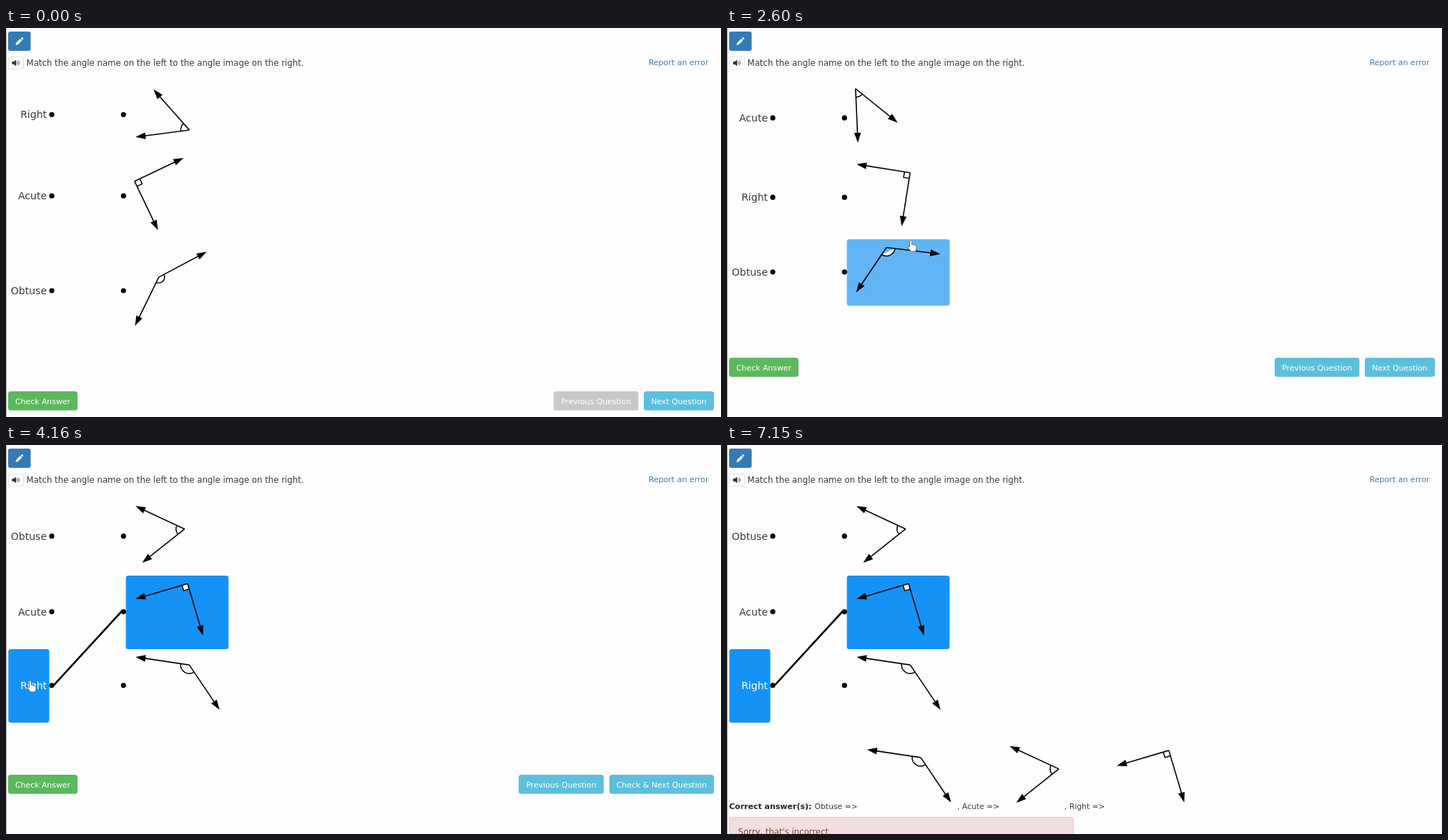
These frames come from a looping animation (1000x545 px, 8.06 s). An HTML page:

```html
<!DOCTYPE html>
<html lang="en">
<head>
<meta charset="utf-8">
<title>Match the angles</title>
<style>
html, body { margin: 0; width: 100%; height: 100%; overflow: hidden; background: #fefefe; }
svg { display: block; width: 100%; height: 100%; font-family: "DejaVu Sans", Verdana, sans-serif; }
</style>
</head>
<body>
<svg viewBox="0 0 1000 545">
  <rect width="1000" height="545" fill="#fefefe"/>
  <rect width="1" height="545" fill="#b4b4b4"/>
  <rect x="3" y="5" width="31.5" height="27" rx="3" fill="#337ab7"/>
  <path d="M13.4 24l.8-3.2 5.8-5.8 2.4 2.4-5.8 5.800zM20.700 14.300l1-1q.6-.5 1.200 0l1.200 1.200q.5.6 0 1.200l-1 1z" fill="#fff"/>
  <rect x="3.5" y="40.5" width="21" height="17" rx="2" fill="#fff" stroke="#e2e2e2"/>
  <path d="M8.500 47h2.500l3.200-2.600v9.200l-3.200-2.600h-2.500z" fill="#333"/>
  <path d="M15.600 47q1.500 2 0 4M17.300 45.600q2.600 3.400 0 6.800" fill="none" stroke="#444" stroke-width=".9"/>
  <text x="28.5" y="53" font-size="11.75" fill="#383838">Match the angle name on the left to the angle image on the right.</text>
  <text x="982.5" y="51.5" font-size="11" fill="#3a7ca8" text-anchor="end">Report an error</text>
  <g id="scene"></g>
  <g id="pointer"></g>
</svg>
<script>
const LOOP = 8060, STEP = 130;
const PICKED = 3510, MATCHED = 4160, CHECKED = 5200;
const RAY = 75.9, MARGIN = 1.4;   // ray length and free space past each tip
const BLUE = '#5bc0de', INK = '#383838';
const scene = document.getElementById('scene');
const pointer = document.getElementById('pointer');

// Angles are [direction of the first ray, opening], in degrees clockwise
const pages = [
  { from: 0, names: ['Right', 'Acute', 'Obtuse'], angles: [[172.5, 56], [-25.5, 90], [-28, 144]] },
  { from: 650, names: ['Right', 'Acute', 'Obtuse'], angles: [[-51, 53.5], [179, 155], [207, 90]] },
  { from: 2470, names: ['Acute', 'Right', 'Obtuse'], angles: [[39, 48.5], [99, 90], [7, 117]] },
  { from: 2990, names: ['Obtuse', 'Acute', 'Right'], angles: [[141.5, 63.5], [73.5, 90], [56, 132.5]] }
];

// Pointer path: time, x, y
const path = [
  [130, 830, 530], [650, 941, 522], [1170, 941, 522], [1950, 360, 364], [2080, 360, 364],
  [2340, 941, 412], [2600, 257, 297], [2860, 941, 474], [2990, 941, 474], [3120, 226, 240],
  [3380, 226, 240], [3510, 226, 300], [4160, 34, 330], [4420, 34, 330], [4810, 49, 463],
  [5200, 52, 475], [5330, 52, 475], [5980, 517, 472], [6890, 517, 472], [7150, 800, 545]
];

const box = (x, y, w, h, r, fill, line = 'none') =>
  `<rect x="${x}" y="${y}" width="${w}" height="${h}" rx="${r}" fill="${fill}" stroke="${line}"/>`;
const label = (x, y, size, fill, str, more = '') =>
  `<text x="${x}" y="${y}" font-size="${size}" fill="${fill}" ${more}>${str}</text>`;
const dot = (x, y) => `<circle cx="${x}" cy="${y}" r="3.6"/>`;
const button = (x, y, w, fill, str, ink = '#fff') =>
  box(x, y, w, 26.7, 3.5, fill) + label(x + w / 2, y + 17.5, 10.9, ink, str, 'text-anchor="middle"');

// Extent of an angle around its vertex
function extent([dir, open]) {
  const rays = [dir, dir + open].map(d => d * Math.PI / 180);
  const xs = rays.map(a => Math.cos(a) * (RAY + MARGIN)), ys = rays.map(a => Math.sin(a) * (RAY + MARGIN));
  const left = Math.min(0, ...xs), top = Math.min(0, ...ys);
  return { left, top, w: Math.max(0, ...xs) - left, h: Math.max(0, ...ys) - top };
}

// Stack the angles below each other; panels, dots and buttons follow from their sizes
for (const page of pages) {
  let y = 85;
  page.rows = page.angles.map(angle => {
    const size = extent(angle), top = y;
    y += size.h + 28.4;
    return { angle, size, top, mid: top + size.h / 2 + 2.3, panelTop: Math.round(top - 11.2), panelEnd: Math.round(y - 11.2) };
  });
  page.panelWidth = Math.max(...page.rows.map(r => r.size.w)) + 24;
  page.bar = Math.round(y + 61.8);
}

// Draw an angle with the top left corner of its extent at x, y
function drawAngle([dir, open], size, x, y) {
  const r = dir < 0 ? 8 : 12, turn = open * Math.PI / 180;
  const mark = open === 90 ? 'M8 0V8H0' : `M${r} 0A${r} ${r} 0 0 1 ${r * Math.cos(turn)} ${r * Math.sin(turn)}`;
  const ray = deg => `<g transform="rotate(${deg})"><path d="M0 0H${RAY - 8}" stroke="#000" stroke-width="1.6"/>` +
    `<path d="M${RAY} 0l-14-4.700v9.400z"/></g>`;
  return `<g transform="translate(${x - size.left} ${y - size.top}) rotate(${dir})">` +
    (open === 90 ? '<path d="M0 0H8V8H0z" fill="#fff"/>' : '') +
    `<path d="${mark}" fill="#fff" stroke="#000" stroke-width="1.5"/>${ray(0)}${ray(open)}</g>`;
}

function pointerAt(t) {
  const i = path.findIndex(k => k[0] > t);
  if (i < 1) return null;
  const [a, x1, y1] = path[i - 1], [b, x2, y2] = path[i];
  const k = (t - a) / (b - a), ease = k * k * (3 - 2 * k);
  return { x: x1 + (x2 - x1) * ease, y: y1 + (y2 - y1) * ease };
}

// What lies under the pointer: a side and row of the quiz, or a button
function hit(page, p, t) {
  if (!p || t >= CHECKED) return {};
  const row = page.rows.findIndex(r => p.y >= r.panelTop && p.y < r.panelEnd);
  if (row >= 0 && p.x > 3 && p.x < 61) return { side: 'left', row };
  if (row >= 0 && p.x > 168 && p.x < 168 + page.panelWidth) return { side: 'right', row };
  const onBar = p.y > page.bar + 1 && p.y < page.bar + 26;
  return { button: onBar && (p.x < 100 || p.x > 766) };
}

function panels(t, page, over) {
  return page.rows.map((r, i) => ['left', 'right'].map(side => {
    const picked = side === 'right' ? t >= PICKED && i === 1 : t >= MATCHED && i === 2;
    if (!picked && !(over.side === side && over.row === i)) return '';
    const [x, w] = side === 'left' ? [3.3, 57.2] : [167.6, page.panelWidth];
    return box(x, r.panelTop, w, r.panelEnd - r.panelTop, 3.5, picked ? '#1592f6' : '#62b5f4');
  }).join('')).join('');
}

function buttons(t, page) {
  const y = page.bar, check = button(3, y, 97, '#5cb85c', 'Check Answer');
  if (t >= MATCHED) {
    return check + button(717, y, 119, BLUE, 'Previous Question') +
      button(844, y, 146, BLUE, 'Check &amp; Next Question');
  }
  return check + button(766, y, 118.5, page.from ? BLUE : '#c8c8c8', 'Previous Question') +
    button(892, y, 98, BLUE, 'Next Question');
}

function feedback([acute, right, obtuse]) {
  let x = 122.5, out = label(3, 510, 11, '#222', 'Correct answer(s):', 'font-weight="bold"');
  [['Obtuse', obtuse], [', Acute', acute], [', Right', right]].forEach(([name, r]) => {
    out += label(x, 510, 10.8, INK, name + ' =&gt;') + drawAngle(r.angle, r.size, x + 72, 502 - r.size.h);
    x += r.size.w + 79.8;
  });
  return out + box(3.5, 521.5, 481, 40, 3, '#f2dede', '#ebccd1') +
    label(15.5, 545.5, 11.7, '#7d4744', "Sorry, that's incorrect.");
}

function drawScene(t, page, over) {
  let out = panels(t, page, over);
  page.rows.forEach((r, i) => {
    const ink = t >= MATCHED && i === 2 ? '#fff' : INK;
    out += label(57, r.mid + 5.2, 14, ink, page.names[i], 'text-anchor="end"') + dot(64, r.mid) + dot(164.3, r.mid) +
      drawAngle(r.angle, r.size, 179.8, r.top);
  });
  if (t >= MATCHED) out += `<path d="M66.5 ${page.rows[2].mid}L162 ${page.rows[1].mid - .8}" stroke="#000" stroke-width="2.6"/>`;
  if (t >= 1820 && t < 2080) out += box(25, 40, 3.5, 17.5, 0, '#2b84d0');
  return out + (t >= CHECKED ? feedback(page.rows) : buttons(t, page));
}

function drawPointer(p, over) {
  if (!p) return '';
  const shape = over.side || over.button
    ? 'M-1.500 1.500Q0-1 1.500 1.500V6.500Q3 5.500 4 7Q5.500 6.200 6.300 7.700Q8 7.200 8 9V12Q7.500 14 6.500 16H0Q-1.500 13.500-4 10.500Q-4.500 8.500-2.500 9.200L-1.500 10z'
    : 'M0 0V15.500L3.600 12.200L6 17.300L8.300 16.200L6 11.200H10.800z';
  return `<path transform="translate(${p.x} ${p.y})" d="${shape}" fill="#fff" stroke="#555" stroke-width=".8"/>`;
}

let last = -1;
function update(now) {
  const t = Math.floor((now % LOOP) / STEP) * STEP;
  if (t !== last) {
    last = t;
    const page = pages.filter(p => t >= p.from).pop();
    const p = pointerAt(t), over = hit(page, p, t);
    scene.innerHTML = drawScene(t, page, over);
    pointer.innerHTML = drawPointer(p, over);
  }
  requestAnimationFrame(update);
}
update(0);
</script>
</body>
</html>
```
